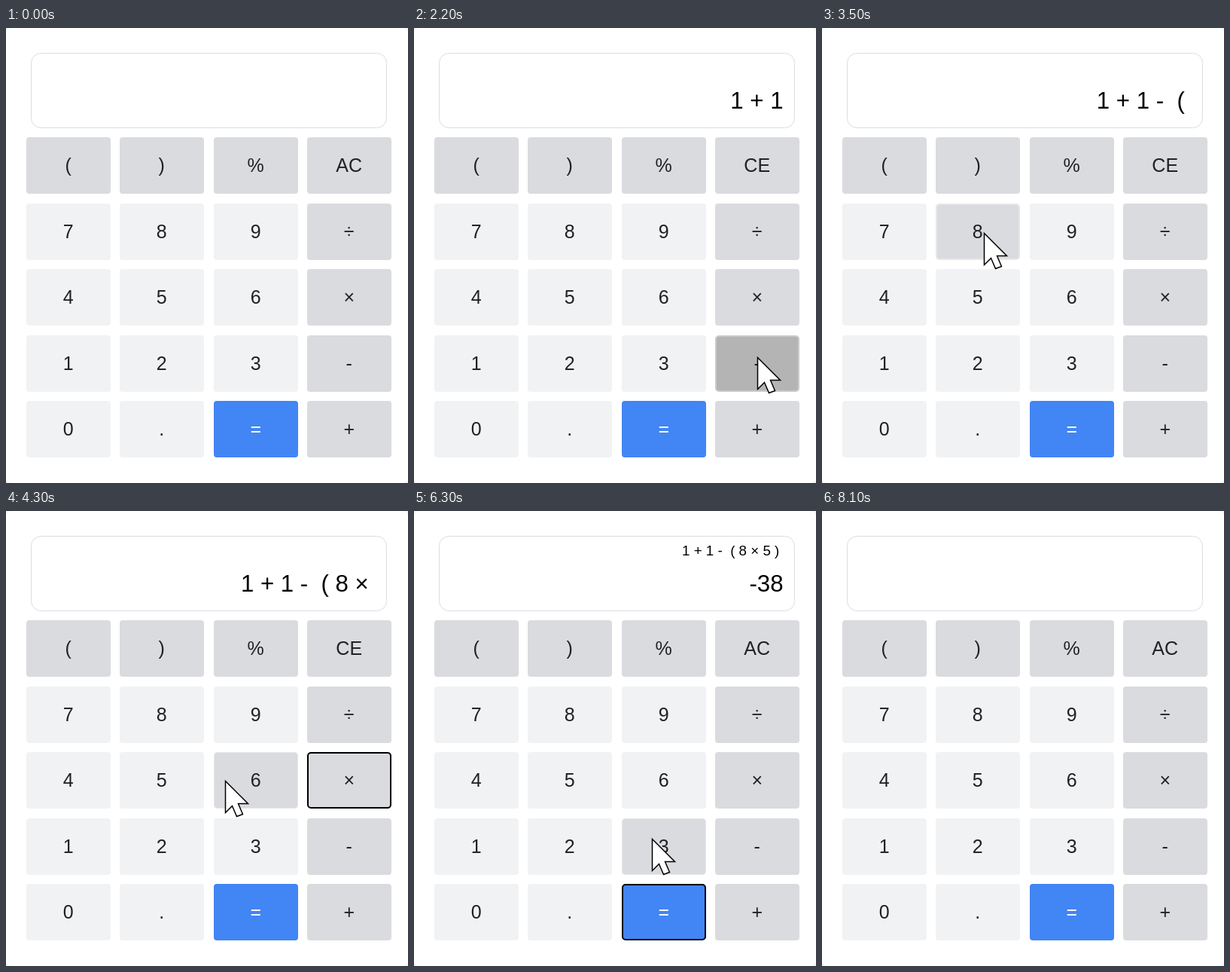
These frames come from a looping animation (534x604 px, 8200 ms). An HTML page:

```html
<!DOCTYPE html>
<html lang="en">
<head>
<meta charset="utf-8">
<title>Calculator</title>
<style>
  html, body { margin: 0; width: 100%; height: 100%; overflow: hidden; background: #f3f3f3; }
  svg { display: block; width: 534px; height: 604px; }
  text { font-family: "Liberation Sans", Arial, sans-serif; font-size: 25px; fill: #202124; text-anchor: middle; }
  .number { fill: #f1f2f4; }
  .operator { fill: #dadbdf; }
  .equals { fill: #4285f4; }
  .number.hover { fill: #dadbdf; stroke: #e6e7ea; }
  .operator.hover { fill: #b4b4b4; stroke: #cacaca; }
  .equals.hover { fill: #3b78e7; }
  rect.focus { stroke: #000; stroke-width: 2; }
  .equals + text { fill: #fff; }
  #main, #history { text-anchor: end; fill: #000; }
  #main { font-size: 31.2px; }
  #history { font-size: 18.75px; }
</style>
</head>
<body>
<svg viewBox="0 0 534 604">
  <rect width="534" height="604" rx="7" fill="#fff"/>
  <rect x="33.5" y="33.5" width="472" height="99" rx="13" fill="#fff" stroke="#dadce0"/>
  <text id="history" x="490.5" y="59"></text>
  <text id="main" x="490.5" y="107"></text>
  <g id="keypad"></g>
  <path id="cursor" d="M0 0V42L9 33L15 47L23 44L17 30H30Z" fill="#fff" stroke="#000" stroke-width="1.5"/>
</svg>
<script>
const LOOP = 8200, STEP = 100, CURSOR_IN = 100, CURSOR_OUT = 8100;
const ROWS = [['(', ')', '%', 'AC'], ['7', '8', '9', '÷'], ['4', '5', '6', '×'],
              ['1', '2', '3', '-'], ['0', '.', '=', '+']];
const WIDTH = 112, HEIGHT = 75;

const smooth = u => u * u * (3 - 2 * u);
const easeIn = u => u * u;
const easeOut = u => u * (2 - u);

// time, x, y, easing towards this point
const PATH = [
  [100, 165, 585], [500, 88, 442], [800, 88, 442],
  [1200, 437, 533], [1400, 437, 533],
  [1700, 100, 440], [1900, 100, 440],
  [2100, 456, 437], [2400, 456, 437],
  [2800, 85, 185], [3000, 85, 185],
  [3400, 215, 272], [3600, 215, 272],
  [3900, 455, 355], [4050, 455, 355],
  [4450, 215, 360], [4800, 215, 360],
  [5200, 208, 185], [5400, 208, 185],
  [5800, 314, 528], [6100, 314, 528],
  [6300, 316, 435, easeIn], [7000, 452, 183, easeOut]
];

// time of press, key, display after release, history
const PRESSES = [
  [600, '1', '1'],
  [1300, '+', '1 + '],
  [1800, '1', '1 + 1'],
  [2200, '-', '1 + 1 -  '],
  [2900, '(', '1 + 1 -  ( '],
  [3500, '8', '1 + 1 -  ( 8'],
  [4000, '×', '1 + 1 -  ( 8 × '],
  [4700, '5', '1 + 1 -  ( 8 × 5'],
  [5300, ')', '1 + 1 -  ( 8 × 5 ) '],
  [5900, '=', '-38', '1 + 1 -  ( 8 × 5 ) '],
  [7500, 'AC', '']
];

const byId = id => document.getElementById(id);
const [main, history, keypad, cursor] = ['main', 'history', 'keypad', 'cursor'].map(byId);

function add(tag, attributes) {
  const node = document.createElementNS('http://www.w3.org/2000/svg', tag);
  for (const name in attributes) node.setAttribute(name, attributes[name]);
  return keypad.appendChild(node);
}

function makeKey(name, row, column) {
  const x = Math.round(27 + column * 124.4), y = Math.round(145.2 + row * 87.5);
  const type = name === '=' ? 'equals' : row === 0 || column === 3 ? 'operator' : 'number';
  const rect = add('rect', { x, y, width: WIDTH, height: HEIGHT, rx: 4, class: type });
  const label = add('text', { x: x + 55.7, y: y + 46 });
  label.textContent = name;
  return { name, x, y, type, rect, label };
}

const keys = ROWS.flatMap((names, row) => names.map((name, column) => makeKey(name, row, column)));
const clearKey = keys.find(key => key.name === 'AC');

function cursorAt(time) {
  const next = PATH.findIndex(point => point[0] > time);
  if (next < 0) return PATH[PATH.length - 1].slice(1, 3);
  const [t0, x0, y0] = PATH[next - 1], [t1, x1, y1, ease = smooth] = PATH[next];
  const u = ease((time - t0) / (t1 - t0));
  return [x0 + (x1 - x0) * u, y0 + (y1 - y0) * u];
}

const lastPress = time => PRESSES.filter(press => press[0] <= time).pop() || [0, '', ''];
const keepSpaces = text => text.replace(/ /g, '\u00a0');

function paintKey(key, x, y, focused) {
  const hover = x >= key.x && x < key.x + WIDTH && y >= key.y && y < key.y + HEIGHT;
  key.rect.setAttribute('class', key.type + (hover ? ' hover' : '') + (focused ? ' focus' : ''));
  // keep the outline inside the key
  const inset = focused ? 1 : hover ? 0.5 : 0;
  key.rect.setAttribute('x', key.x + inset);
  key.rect.setAttribute('y', key.y + inset);
  key.rect.setAttribute('width', WIDTH - 2 * inset);
  key.rect.setAttribute('height', HEIGHT - 2 * inset);
}

function draw(time) {
  const active = time >= CURSOR_IN && time < CURSOR_OUT;
  const [x, y] = active ? cursorAt(time) : [-100, -100];
  cursor.setAttribute('transform', `translate(${Math.round(x) + 0.5} ${Math.round(y) + 0.5})`);

  const focus = active ? lastPress(time)[1] : '';
  for (const key of keys) paintKey(key, x, y, key.name === focus);

  const [, , value, past = ''] = lastPress(time - STEP);
  main.textContent = keepSpaces(value);
  history.textContent = keepSpaces(past);
  clearKey.label.textContent = value && !past ? 'CE' : 'AC';
}

const start = performance.now();
function tick() {
  const time = (performance.now() - start) % LOOP;
  draw(Math.floor(time / STEP) * STEP);
  requestAnimationFrame(tick);
}
tick();
</script>
</body>
</html>
```
